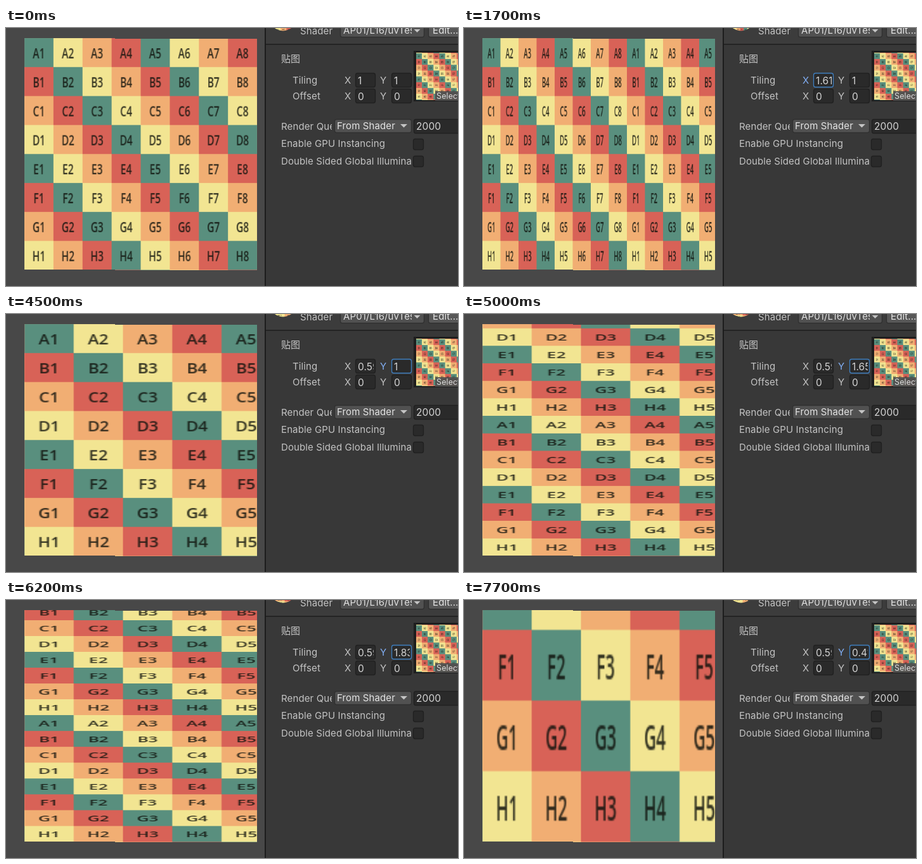
Animation of 713x408 px, one loop 9.3 s. Source, as an HTML page with a canvas:

```html
<!DOCTYPE html>
<html lang="en">
<head>
<meta charset="utf-8">
<title>Texture tiling</title>
<style>
  html, body { margin: 0; width: 100%; height: 100%; overflow: hidden; background: #484848; }
  canvas { display: block; }
</style>
</head>
<body>
<canvas id="stage" width="713" height="408"></canvas>
<script>
const ctx = document.getElementById('stage').getContext('2d');
const LOOP = 9300, STEP = 100;
const TEXTURE_SIZE = 320;
const TILE_COLORS = ['#598f7e', '#f2e592', '#f1ae73', '#d86257'];
const TEXT = '#c4c4c4', FIELD_TEXT = '#d4d4d4', DARK = '#202020';
const FOCUS_LABEL = '#83b0f7', FOCUS_BORDER = '#3f7fc0', HOVER_BORDER = '#656565';
const UI_FONT = 'Inter, "Noto Sans CJK SC", "Noto Sans CJK", sans-serif';

// Mouse drags: start time, number of steps, value before, value after, easing power
const DRAG_X = [
  [1200, 6, 1, 1.61, 1],
  [2700, 8, 1.61, 0.59, 1.26]
];
const DRAG_Y = [
  [4700, 8, 1, 2.31, 1],
  [6000, 8, 2.31, 0.93, 0.91],
  [6900, 1, 0.93, 0.91, 1],
  [7200, 6, 0.91, 0.41, 1]
];

function valueAt(drags, t) {
  let value = 1;
  for (const [start, steps, from, to, power] of drags) {
    if (t < start) break;
    const p = Math.min(1, (Math.floor((t - start) / STEP) + 1) / steps);
    value = from + (to - from) * (1 - (1 - p) ** power);
  }
  return value;
}

// Labelled checker image, sampled smoothly like a low-resolution texture
function makeTexture() {
  const image = document.createElement('canvas');
  image.width = image.height = TEXTURE_SIZE;
  const g = image.getContext('2d');
  const cell = TEXTURE_SIZE / 8;
  g.font = `600 ${cell / 2}px "Open Sans", "Noto Sans", sans-serif`;
  g.textAlign = 'center';
  for (let row = 0; row < 8; row++) {
    for (let col = 0; col < 8; col++) {
      g.fillStyle = TILE_COLORS[(col - row + 8) % 4];
      g.fillRect(col * cell, row * cell, cell, cell);
      g.save();
      g.translate((col + 0.5) * cell, (row + 0.5) * cell);
      g.scale(0.68, 1);
      g.fillStyle = 'rgba(18, 20, 14, 0.85)';
      g.fillText('ABCDEFGH'[row] + (col + 1), 0, cell * 0.188);
      g.restore();
    }
  }
  return ctx.createPattern(image, 'repeat');
}
const pattern = makeTexture();

// Fills a rectangle with the texture, repeated from its bottom left corner
function texture(x, y, w, h, tilingX, tilingY) {
  const sx = w / tilingX / TEXTURE_SIZE, sy = h / tilingY / TEXTURE_SIZE;
  ctx.save();
  ctx.imageSmoothingQuality = 'medium';
  ctx.translate(x, y + h);
  ctx.scale(sx, sy);
  ctx.fillStyle = pattern;
  ctx.fillRect(0, -(h + 1) / sy, w / sx, (h + 2) / sy);
  ctx.restore();
}

function clipped(path, draw) {
  ctx.save();
  ctx.beginPath();
  path();
  ctx.clip();
  draw();
  ctx.restore();
}

function text(str, x, y, { color = TEXT, size = 15, right = 800 } = {}) {
  clipped(() => ctx.rect(x - 1, y - 30, right - x + 1, 45), () => {
    ctx.font = `${size}px ${UI_FONT}`;
    ctx.letterSpacing = '0.12px';
    ctx.fillStyle = color;
    ctx.fillText(str, x, y);
  });
}

function box(x, y, w, h, fill = '#2a2a2a', border = DARK) {
  ctx.beginPath();
  ctx.roundRect(x + 0.5, y + 0.5, w - 1, h - 1, 3);
  ctx.fillStyle = fill;
  ctx.fill();
  ctx.strokeStyle = border;
  ctx.lineWidth = 1.3;
  ctx.stroke();
}

function arrow(x, y, w) {
  ctx.beginPath();
  ctx.moveTo(x, y);
  ctx.lineTo(x + w, y);
  ctx.lineTo(x + w / 2, y + w / 2);
  ctx.fillStyle = TEXT;
  ctx.fill();
}

function drawScene(tx, ty) {
  ctx.fillStyle = '#484848';
  ctx.fillRect(0, 0, 713, 408);
  // The plane is tilted by about one pixel, which shows as a step in its edges
  clipped(() => {
    ctx.rect(29, 16, 143, 366);
    ctx.rect(172, 17, 224, 366);
  }, () => texture(29, 16, 367, 366.5, tx, ty));
}

function drawHeader(tx, ty) {
  ctx.fillStyle = '#383838';
  ctx.fillRect(409, 0, 304, 408);
  ctx.fillStyle = '#3c3c3c';
  ctx.fillRect(409, 0, 304, 25);
  ctx.fillStyle = '#1d1d1d';
  ctx.fillRect(408, 0, 2, 408);
  ctx.fillRect(409, 25, 304, 1.5);
  clipped(() => ctx.arc(437, -17, 21.5, 0, Math.PI * 2),
    () => texture(424, -39, 44, 44, tx * 0.6, ty));
  text('Shader', 464, 10);
  box(527, -8, 133, 23, '#515151', '#303030');
  text('AP01/L16/uvTest', 532, 9, { color: '#e0e0e0', right: 640 });
  arrow(643.5, 2, 10);
  box(666, -8, 60, 23, '#585858', '#303030');
  text('Edit...', 673, 9, { color: '#e8e8e8' });
}

function drawField(x, y, value, border) {
  box(x, y, 32, 23, '#2a2a2a', border);
  text(value, x + 4, y + 17.5, { color: FIELD_TEXT, size: 15.5, right: x + 29 });
}

function drawProperties(t, tx, ty) {
  const focus = t < 1200 ? '' : t < 4500 ? 'X' : 'Y';
  const hover = t < 300 || t >= 1200 ? '' : t < 400 ? 'Y' : t < 500 ? '' : 'X';

  text('贴图', 434, 53.5);
  text('Tiling', 452, 88);
  text('Offset', 452, 113);
  for (const [name, x, value] of [['X', 534, tx], ['Y', 590, ty]]) {
    const fieldX = x + (name === 'X' ? 17 : 18);
    const border = focus === name ? FOCUS_BORDER : hover === name ? HOVER_BORDER : DARK;
    text(name, x, 88, { color: focus === name ? FOCUS_LABEL : TEXT });
    text(name, x, 113);
    drawField(fieldX, 71, String(+value.toFixed(3)), border);
    drawField(fieldX, 96, '0', DARK);
  }

  ctx.fillStyle = '#1e1e1e';
  ctx.fillRect(643, 36, 70, 80);
  texture(647, 40, 73, 73, 1, 1);
  ctx.fillStyle = 'rgba(80, 80, 80, 0.95)';
  ctx.fillRect(677, 100, 36, 15);
  text('Select', 679, 112, { size: 12.5, color: '#dedede' });
}

function drawOptions() {
  text('Render Queue', 434, 161, { right: 514 });
  box(518, 144, 122, 22, '#515151', '#303030');
  text('From Shader', 522, 160, { color: '#e4e4e4' });
  arrow(622, 152, 11);
  box(643, 144, 80, 23);
  text('2000', 647, 161, { color: FIELD_TEXT, size: 15.5 });
  text('Enable GPU Instancing', 434, 188);
  box(642, 175, 17, 18);
  text('Double Sided Global Illumination', 434, 216, { right: 639 });
  box(642, 202, 17, 18);
}

function render(now) {
  const t = now % LOOP;
  const tx = valueAt(DRAG_X, t), ty = valueAt(DRAG_Y, t);
  drawScene(tx, ty);
  drawHeader(tx, ty);
  drawProperties(t, tx, ty);
  drawOptions();
}

const startTime = performance.now();
function frame() {
  render(performance.now() - startTime);
  requestAnimationFrame(frame);
}
frame();
</script>
</body>
</html>
```
